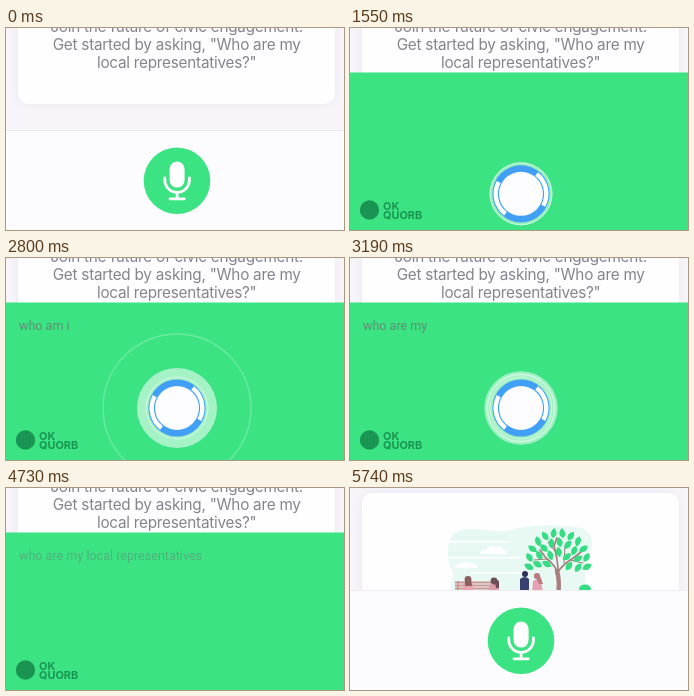
Animation of 338 by 202 pixels, one loop 5840 ms. Source, as an HTML page:

```html
<!DOCTYPE html>
<html lang="en">
<head>
<meta charset="utf-8">
<title>Voice assistant</title>
<style>
html, body { margin: 0; width: 100%; height: 100%; overflow: hidden; background: #f7f5fa; }
svg { display: block; width: 100vw; height: 100vh; }
.intro { font: 15.3px Inter, Roboto, sans-serif; letter-spacing: -.25px; fill: #85838c; text-anchor: middle; }
.query { font: 12.55px Roboto, "Liberation Sans", sans-serif; fill: #5c9074; }
.brand { font: 700 10.9px Inter, Lato, sans-serif; fill: #168a4c; }
.ripple { fill: none; stroke: #fff; stroke-width: 1.6; }
.card { fill: #fefdff; filter: drop-shadow(0 0 4px rgba(70, 50, 100, .07)); }
</style>
</head>
<body>
<svg viewBox="0 0 338 202" preserveAspectRatio="none">
  <defs>
    <clipPath id="reveal"><circle id="hole" cx="171" cy="152.7" r="33"/></clipPath>
    <clipPath id="panelBox"><rect y="44.4" width="338" height="158"/></clipPath>
    <path id="leaf" d="M0 5Q-6 0 0 -5.5Q6 0 0 5Z"/>
  </defs>
  <rect width="338" height="202" fill="#f7f5fa"/>

  <g id="welcome">
    <rect class="card" x="12" y="-60" width="317" height="136" rx="10"/>
    <g class="intro">
      <text x="170.7" y="4">Join the future of civic engagement.</text>
      <text x="170.7" y="22">Get started by asking, "Who are my</text>
      <text x="170.7" y="40">local representatives?"</text>
    </g>
  </g>

  <g id="answer">
    <rect class="card" x="12" y="5" width="317" height="180" rx="10"/>
    <path fill="#e8f9f4" d="M98 62C98 49 104 42 116 41C132 39 146 46 162 42C180 36 212 37 232 40C246 46 243 60 237 70C231 82 240 92 232 110H100C99 98 106 92 102 82C98 76 98 70 98 62Z"/>
    <g fill="#fefdff">
      <path d="M130 66q1-4 6-4q4-6 10-3q6-2 8 3q4 1 3 4z"/>
      <path d="M104 80q1-4 6-4q4-4 9-1q7-1 9 5z"/>
      <rect x="98" y="53" width="62" height="1.6" rx=".8"/>
      <rect x="98" y="69" width="72" height="1.6" rx=".8"/>
      <rect x="120" y="84" width="52" height="1.6" rx=".8"/>
    </g>
    <g stroke="#cd9795" stroke-width="1.8">
      <path d="M105 94.5H149M105 97.5H149M105 100.5H149M108 93V106M146 93V106"/>
    </g>
    <path fill="#e3a7ad" d="M113 103V96q5-5 10 0v7z"/>
    <circle cx="118" cy="91.5" r="3.4" fill="#8c5f60"/>
    <path fill="#8c5f60" d="M115 91h6l1 7h-7z"/>
    <path fill="#dd9ba8" d="M138 103l2-6q4-3 8 1v5z"/>
    <circle cx="144" cy="93" r="3.4" fill="#705058"/>
    <path fill="#705058" d="M144 90l5 3v7h-3z"/>
    <path fill="#39406f" d="M170 104V91q5-4 9 0v13z"/>
    <circle cx="175" cy="86" r="3" fill="#2d3158"/>
    <path fill="#e6a2b4" d="M182 104l1-11q4-3 8 0l2 11z"/>
    <circle cx="187" cy="88" r="3.1" fill="#b87b80"/>
    <path fill="#b87b80" d="M185 88h5l3 8h-4z"/>
    <g fill="none" stroke="#a87e7c" stroke-linecap="round">
      <path stroke-width="4.4" d="M208 108Q210 93 207 83"/>
      <path stroke-width="1.7" d="M208 88Q207 78 196 70L190 62M208 84Q208 72 204 58L207 50M208 84Q213 76 222 71L231 64"/>
      <path stroke-width="1.1" d="M197 71L184 72M205 63L198 54M214 75L215 58M220 72L233 75"/>
    </g>
    <g id="leaves" fill="#36dc82"></g>
    <ellipse cx="235" cy="101" rx="6" ry="4.5" fill="#36dc82"/>
  </g>

  <rect y="102" width="338" height="100" fill="#fcfbfe"/>
  <path d="M0 102.5H338" stroke="#efedf2"/>
  <circle cx="171" cy="152.7" r="33.3" fill="#3be383"/>

  <g id="panel" clip-path="url(#reveal)"><g clip-path="url(#panelBox)">
    <rect y="44" width="338" height="158" fill="#3be383"/>
    <text id="query" class="query" x="13" y="71.5"></text>
    <g opacity=".88">
      <circle cx="19.5" cy="182" r="9.7" fill="#168a4c"/>
      <text class="brand" x="33" y="181.5">OK</text>
      <text class="brand" x="33" y="190.5">QUORB</text>
    </g>
    <g id="ripples"></g>
    <g id="orb">
      <circle id="halo" r="31.5" fill="#fff"/>
      <circle r="31" fill="none" stroke="#fff" stroke-opacity=".5"/>
      <circle r="28.6" fill="#419ff6"/>
      <g id="arcs" fill="none" stroke="#fff" stroke-width="4.4"></g>
      <circle r="22" fill="#fdfdff"/>
    </g>
  </g></g>

  <g id="mic" fill="none" stroke="#fff" stroke-width="2.8" stroke-linecap="round">
    <rect x="163.6" y="133.6" width="15" height="26" rx="7.5" fill="#fff" stroke="none"/>
    <path d="M158.8 150V152a12.3 12.3 0 0 0 24.6 0V150M171.1 164.5V170.6M164 170.8H178.3"/>
  </g>
</svg>
<script>
const LOOP = 5840;
const NS = "http://www.w3.org/2000/svg";
const $ = id => document.getElementById(id);

function add(parent, tag, attrs) {
  const el = document.createElementNS(NS, tag);
  for (const k in attrs) el.setAttribute(k, attrs[k]);
  return $(parent).appendChild(el);
}

// Piecewise linear value from [time, value] steps
function track(t, steps) {
  if (t <= steps[0][0]) return steps[0][1];
  for (let i = 1; i < steps.length; i++) {
    const [a, u] = steps[i - 1], [b, v] = steps[i];
    if (t < b) return u + (v - u) * (t - a) / (b - a);
  }
  return steps[steps.length - 1][1];
}
const span = (t, a, b) => Math.min(1, Math.max(0, (t - a) / (b - a)));
const latest = (t, steps) => steps.reduce((v, s) => t >= s[0] ? s[1] : v, "");

// Tree crown: rows of leaves fanned around the trunk top
for (const [size, count] of [[1, 12], [0.7, 9], [0.38, 5]]) {
  for (let i = 0; i < count; i++) {
    const a = Math.PI * (0.97 + 1.06 * i / (count - 1)) + (size < 1 ? 0.08 : 0);
    const x = 208 + 29 * size * Math.cos(a);
    const y = 76 + 31 * size * Math.sin(a);
    const turn = Math.cos(a) * 48 + (i % 2 ? 14 : -14);
    add("leaves", "use", { href: "#leaf", transform: `translate(${x} ${y}) rotate(${turn})` });
  }
}

for (const [from, to] of [[-52, 28], [128, 208]]) {
  const at = d => [Math.cos(d * Math.PI / 180), Math.sin(d * Math.PI / 180)].map(v => v * 25.3);
  add("arcs", "path", { d: `M${at(from)}A25.3 25.3 0 0 1 ${at(to)}` });
}

// [birth, final radius]
const ripples = [[1940, 90], [2074, 90], [2520, 83], [3170, 72]].map(([born, max]) =>
  ({ born, max, el: add("ripples", "circle", { class: "ripple", cx: 171, cy: 150 }) }));

const HOLE = [[1250, 33], [1500, 205], [4960, 205], [5020, 106], [5080, 75], [5130, 50], [5190, 33]];
const VOICE = [[1940, 31.5], [2100, 45], [2220, 52], [2400, 44], [2570, 34], [2800, 40],
  [2950, 45], [3140, 35], [3350, 42], [3530, 36], [3700, 31.5]];
const WORDS = [[2630, "who"], [2740, "who am"], [2800, "who am i"], [2970, "who are"],
  [3080, "who are my"], [3250, "who are my local"], [3420, "who are my local rep"],
  [3590, "who are my local representatives"]];

function draw(t) {
  const open = t >= 1260 && t < 5190;
  $("panel").style.display = open ? "" : "none";
  $("hole").setAttribute("r", track(t, HOLE));
  $("mic").style.opacity = track(t, [[1260, 1], [1390, 0], [5060, 0], [5190, 1]]);

  const fresh = t >= 4840;
  $("welcome").style.display = fresh ? "none" : "";
  $("answer").style.display = fresh ? "" : "none";
  $("answer").setAttribute("transform", `translate(0 ${t < 5020 ? -23 : 0})`);
  $("answer").style.opacity = span(t, 4780, 4930);

  const rise = 80 * (1 - span(t, 1430, 1720)) ** 3;
  const drop = 90 * span(t, 4440, 4730) ** 2;
  $("orb").setAttribute("transform", `translate(171 ${150 + rise + drop})`);
  const voice = track(t, VOICE);
  $("halo").setAttribute("r", voice);
  $("halo").setAttribute("fill-opacity", track(voice, [[31.5, 0.46], [40, 0.54], [52, 0.67]]));

  for (const { born, max, el } of ripples) {
    const p = span(t, born, born + 480);
    el.setAttribute("r", 30 + (max - 30) * (1 - (1 - p) ** 2));
    el.setAttribute("stroke-opacity", p > 0 && p < 1 ? 0.5 * (1 - p) : 0);
  }

  $("query").textContent = latest(t, WORDS);
  $("query").setAttribute("y", t < 3000 ? 72.3 : 71.5);
  $("query").style.opacity = track(t, [[4500, 1], [4960, 0.2], [5020, 0]]);
}

const start = performance.now();
function tick() {
  draw((performance.now() - start) % LOOP);
  requestAnimationFrame(tick);
}
tick();
</script>
</body>
</html>
```
